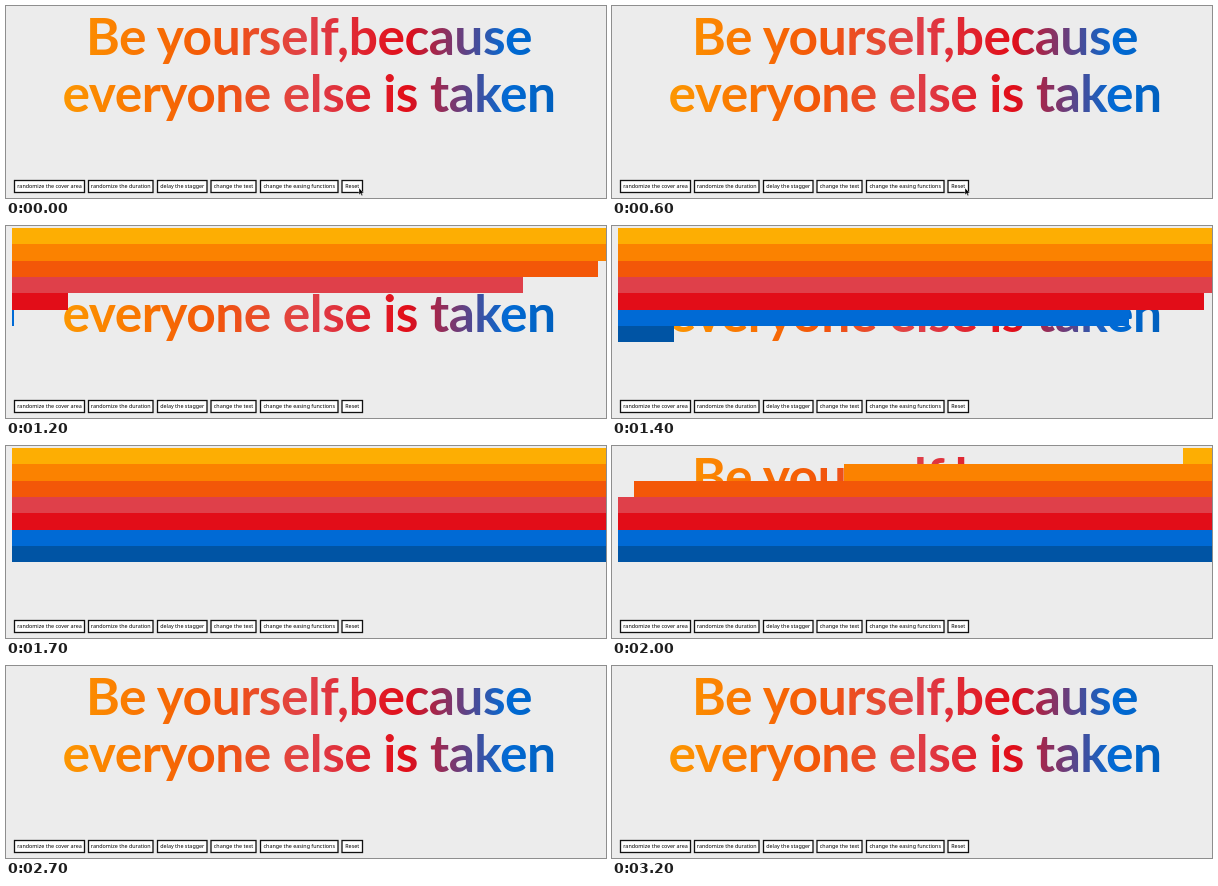
Recreate the animation shown at these times as an HTML page. Size 600x192 px, loop 3300 ms.

```html
<!DOCTYPE html>
<html lang="en">
<head>
<meta charset="utf-8">
<style>
  html, body { margin: 0; width: 100%; height: 100%; overflow: hidden; background: #ececec; }
  svg { display: block; }
  .title { font: bold 51.5px Lato, Ubuntu, sans-serif; letter-spacing: -.5px; fill: url(#rainbow); text-anchor: middle; }
  .label { font: 5.4px "Noto Sans", "Open Sans", sans-serif; text-anchor: middle; }
  .box { fill: #fff; stroke: #111; stroke-width: 1.3; }
</style>
</head>
<body>
<svg id="stage" width="600" height="192" viewBox="0 0 600 192">
  <defs>
    <linearGradient id="rainbow" gradientUnits="userSpaceOnUse" x1="6" x2="600"></linearGradient>
  </defs>
  <text class="title" x="303" y="48.8">Be yourself,because</text>
  <text class="title" x="303" y="105.8">everyone else is taken</text>
  <g id="buttons"></g>
  <g id="bars" shape-rendering="crispEdges"></g>
  <path id="cursor" d="M353 182v6.8l1.6-1.4 1 2.4 1.2-.5-1-2.3h2z" fill="#000" stroke="#fff" stroke-width=".4"/>
</svg>
<script>
const LOOP = 3300, DURATION = 400, STAGGER = 100;
const COVER = 667, UNCOVER = 1717, CURSOR_END = 700;
const LEFT = 6, WIDTH = 594, TOP = 2, BAR = 16.35;
const colors = ['#fdae03', '#fb8200', '#f35708', '#df404a', '#e20d18', '#006ad5', '#0054a4'];
const buttons = [
  ['randomize the cover area', 8.5, 78.5],
  ['randomize the duration', 82.5, 147],
  ['delay the stagger', 151.5, 201],
  ['change the text', 205, 250],
  ['change the easing functions', 254.5, 332],
  ['Reset', 336, 356.5]
];
const $ = id => document.getElementById(id);

function add(parent, tag, attrs, text = '') {
  const el = document.createElementNS('http://www.w3.org/2000/svg', tag);
  for (const key in attrs) el.setAttribute(key, attrs[key]);
  el.textContent = text;
  return parent.appendChild(el);
}

const bezier = (a, b, s) => 3 * s * (1 - s) ** 2 * a + 3 * s * s * (1 - s) * b + s ** 3;

// cubic-bezier(.86, 0, .07, 1), solved by bisection
function ease(p) {
  if (p <= 0) return 0;
  if (p >= 1) return 1;
  let lo = 0, hi = 1;
  for (let i = 0; i < 24; i++) {
    const mid = (lo + hi) / 2;
    if (bezier(.86, .07, mid) < p) lo = mid; else hi = mid;
  }
  return bezier(0, 1, lo);
}

for (const [text, x1, x2] of buttons) {
  add($('buttons'), 'rect', { class: 'box', x: x1, y: 174.5, width: x2 - x1, height: 12 });
  add($('buttons'), 'text', { class: 'label', x: (x1 + x2) / 2, y: 182.4 }, text);
}

const bars = colors.map((color, i) => {
  add($('rainbow'), 'stop', { offset: i / 6, 'stop-color': color });
  const y = Math.round(TOP + i * BAR);
  return add($('bars'), 'rect', { y, height: Math.round(TOP + (i + 1) * BAR) - y, fill: color });
});

function draw() {
  const t = performance.now() % LOOP;
  bars.forEach((bar, i) => {
    const end = ease((t - COVER - i * STAGGER) / DURATION);
    const start = ease((t - UNCOVER - i * STAGGER) / DURATION);
    bar.setAttribute('x', LEFT + start * WIDTH);
    bar.setAttribute('width', (end - start) * WIDTH);
  });
  $('cursor').style.display = t < CURSOR_END ? '' : 'none';
  requestAnimationFrame(draw);
}
draw();
</script>
</body>
</html>
```
